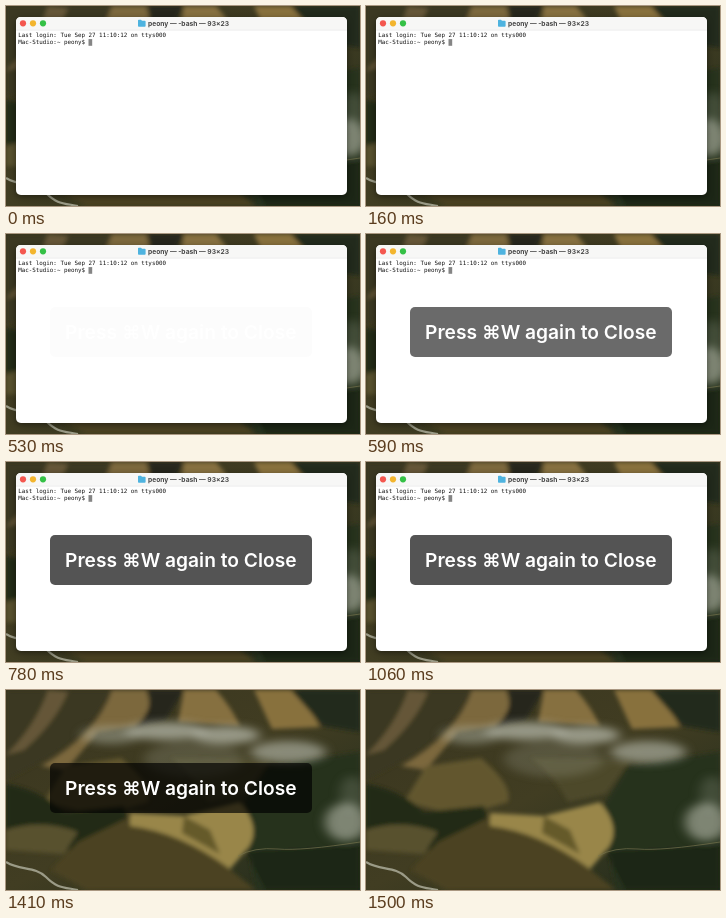
Recreate the animation shown at these times as an HTML page. Size 354x200 px, loop 1930 ms.

```html
<!DOCTYPE html>
<html lang="en">
<head>
<meta charset="utf-8">
<title>Press again to close</title>
<style>
  html, body { margin: 0; width: 100%; height: 100%; overflow: hidden; background: #292c1c; }
  svg { display: block; width: 100vw; height: 100vh; }
  .ui { font-family: Inter, "Noto Sans", sans-serif; }
  .mono { font: 5.85px "DejaVu Sans Mono", "Noto Sans Mono", monospace; fill: #111; white-space: pre; }
</style>
</head>
<body>
<svg viewBox="0 0 354 200" preserveAspectRatio="none">
  <defs>
    <linearGradient id="land" x2="1" y2="1">
      <stop offset="0" stop-color="#39351f"/>
      <stop offset=".5" stop-color="#413d22"/>
      <stop offset="1" stop-color="#202b1c"/>
    </linearGradient>
    <filter id="soft" x="-20%" y="-20%" width="140%" height="140%"><feGaussianBlur stdDeviation="2"/></filter>
    <filter id="fog" x="-50%" y="-100%" width="200%" height="300%"><feGaussianBlur stdDeviation="6 4"/></filter>
    <filter id="shadow" x="-10%" y="-10%" width="120%" height="125%">
      <feDropShadow dx="0" dy="2" stdDeviation="3" flood-opacity=".45"/>
    </filter>
  </defs>

  <rect width="354" height="200" fill="url(#land)"/>
  <g id="hills" filter="url(#soft)"></g>
  <g id="mist" filter="url(#fog)"></g>
  <path d="M0 172 C14 181 29 176 40 187 S56 197 72 200" fill="none" stroke="#9b9b87" stroke-width="2.2"/>
  <path d="M232 166 Q248 157 272 159 T354 152" fill="none" stroke="#76734e" stroke-width="1" opacity=".7"/>

  <g id="terminal">
    <rect x="10" y="11" width="331" height="178" rx="5" fill="#fff" filter="url(#shadow)"/>
    <path d="M10 24V16Q10 11 15 11H336Q341 11 341 16V24Z" fill="#f7f7f6"/>
    <path d="M10 24.2H341" stroke="#dededc" stroke-width=".5"/>
    <circle cx="17" cy="17.3" r="3.1" fill="#f4574f"/>
    <circle cx="27" cy="17.3" r="3.1" fill="#f3b52e"/>
    <circle cx="37" cy="17.3" r="3.1" fill="#35c146"/>
    <path d="M132 14.5Q132 13.8 132.7 13.8H135L136 14.7H138.8Q139.6 14.7 139.6 15.5V20Q139.6 20.8 138.8 20.8H132.8Q132 20.8 132 20Z" fill="#4eb3df"/>
    <text class="ui" x="142" y="19.8" font-size="6.7" font-weight="700" fill="#454545">peony — -bash — 93×23</text>
    <text class="mono" x="12.2" y="31.3">Last login: Tue Sep 27 11:10:12 on ttys000</text>
    <text class="mono" x="12.2" y="38.4">Mac-Studio:~ peony$</text>
    <rect x="82.5" y="33.1" width="3.7" height="6.7" fill="#858585"/>
  </g>

  <g id="notice">
    <rect x="44" y="73" width="262" height="50" rx="5" fill="#000" fill-opacity=".67"/>
    <text class="ui" x="174.8" y="104.6" font-size="19.2" font-weight="600" fill="#fff" text-anchor="middle">Press ⌘W again to Close</text>
  </g>
</svg>
<script>
  const LOOP = 1930;
  const $ = id => document.getElementById(id);

  function add(parent, tag, attrs) {
    const node = document.createElementNS("http://www.w3.org/2000/svg", tag);
    for (const key in attrs) node.setAttribute(key, attrs[key]);
    parent.append(node);
  }

  // Sunlit slopes, shaded valleys and the foreground, back to front.
  [
    ["M0 0H105Q88 35 52 62L0 90Z", "#3a3821"],
    ["M42 0L62 2Q50 32 18 60L0 65Q30 35 42 0Z", "#655637"],
    ["M106 0H140Q150 22 128 37L92 42L60 80L35 76Q90 45 106 0Z", "#7b673c"],
    ["M142 0H178L160 30L128 38Q150 18 142 0Z", "#25281a"],
    ["M178 0H210Q226 18 234 36L172 32Z", "#86703f"],
    ["M248 0H285Q306 20 314 37L266 39Z", "#88713e"],
    ["M285 0H354V42L317 36Z", "#20291b"],
    ["M60 76L115 68Q148 96 142 112L95 126L38 112Z", "#62572f"],
    ["M165 68Q188 85 202 112L240 104L264 70Z", "#4e4a29"],
    ["M262 76L354 62V200H250L235 120Z", "#27321f"],
    ["M0 94Q35 100 58 122L118 116L124 146L60 160L0 142Z", "#232a18"],
    ["M0 140Q35 128 72 142L58 164L0 160Z", "#59512d"],
    ["M72 152L126 126Q180 142 222 178L250 200H80L45 180Z", "#4b4320"],
    ["M124 123L178 126L234 112Q256 138 242 158L224 179Q174 142 124 136Z", "#99864a"],
    ["M178 126L204 140L214 164L176 143Z", "#655a2c"],
    ["M240 162L354 156V200H260Z", "#1d2819"]
  ].forEach(([d, fill]) => add($("hills"), "path", { d, fill }));

  [
    [105, 45, 30, 9, .45],
    [160, 41, 42, 9, .72],
    [220, 45, 34, 9, .72],
    [282, 62, 38, 11, .62],
    [188, 69, 50, 18, .2],
    [340, 132, 21, 19, .6],
    [346, 104, 12, 18, .2]
  ].forEach(([cx, cy, rx, ry, opacity]) =>
    add($("mist"), "ellipse", { cx, cy, rx, ry, opacity, fill: "#b9bcae" }));

  const ramp = (t, start, end) => Math.min(1, Math.max(0, (t - start) / (end - start)));

  function draw(t) {
    $("terminal").setAttribute("visibility", t < 1410 ? "visible" : "hidden");
    $("notice").setAttribute("opacity", ramp(t, 530, 600) * (1 - ramp(t, 1415, 1490)));
  }

  const start = performance.now();
  function tick() {
    draw((performance.now() - start) % LOOP);
    requestAnimationFrame(tick);
  }
  tick();
</script>
</body>
</html>
```
